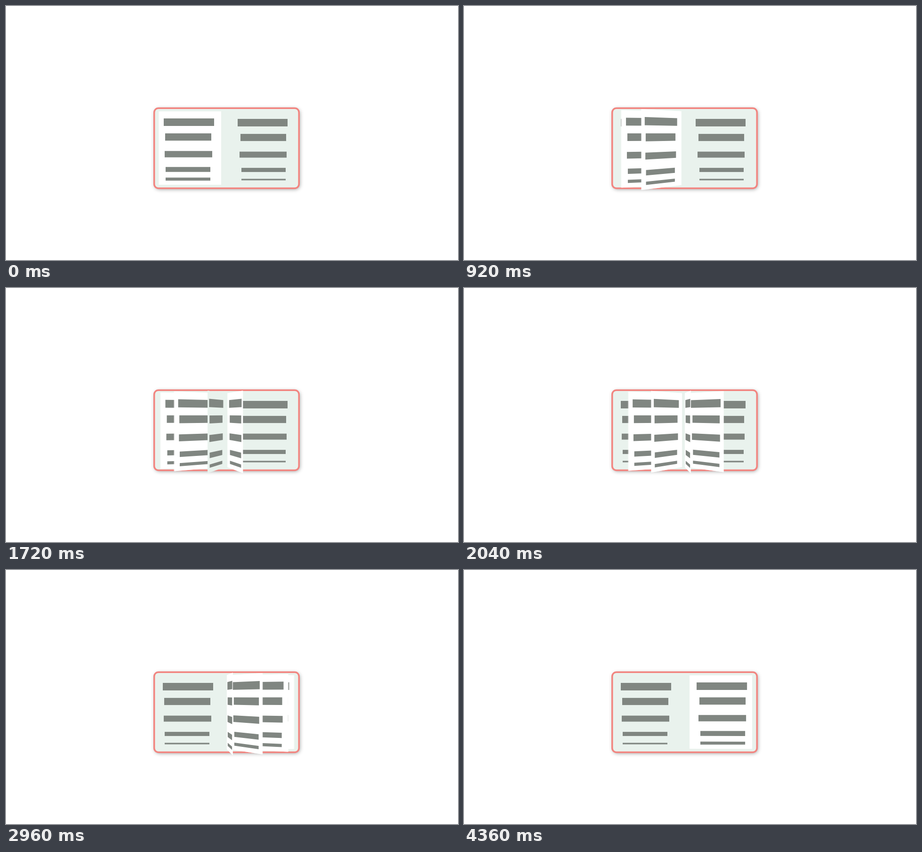
Animation of 960x540 px, one loop 4400 ms. Source, as an HTML page with a canvas:

```html
<!DOCTYPE html>
<html lang="en">
<head>
<meta charset="utf-8">
<title>Turning pages</title>
<style>
  html, body { margin: 0; width: 100%; height: 100%; overflow: hidden; background: #fff; }
  canvas { display: block; width: 960px; height: 540px; }
</style>
</head>
<body>
<canvas id="stage" width="960" height="540"></canvas>
<script>
const ctx = document.getElementById('stage').getContext('2d');

const LOOP = 4400, STEP = 40, TURN = 3000;
const STARTS = [0, 450, 968, 1370];
const SPINE = 468, DEPTH = 1270, EYE_X = 480, EYE_Y = 270;
const INNER = 11, OUTER = 144, SOFT = 1.5, TOP = 224, BOTTOM = 380;
const INK = '#808681', CARD = '#e9f2ed', EDGE = '#f28580';

// Each text line: its middle and its far end, measured from the spine.
// Lines get thinner down the page, and shorter lines start further in.
const LINES = [[247, 133], [278.5, 130], [315, 131], [347.5, 129], [368, 129]]
  .map(([y, far], i) => ({ y, far, near: 26 + 2 * (133 - far), thin: i * i }));

const clamp = v => Math.min(1, Math.max(0, v));

function project(r, y, angle) {
  const k = DEPTH / (DEPTH - r * Math.sin(angle));
  const x = SPINE - r * Math.cos(angle);
  return [EYE_X + (x - EYE_X) * k, EYE_Y + (y - EYE_Y) * k];
}

function fillQuad(r0, r1, top, bottom, angle, color) {
  ctx.fillStyle = color;
  ctx.beginPath();
  ctx.moveTo(...project(r0, top, angle));
  ctx.lineTo(...project(r1, top, angle));
  ctx.lineTo(...project(r1, bottom, angle));
  ctx.lineTo(...project(r0, bottom, angle));
  ctx.closePath();
  ctx.fill();
}

// The front tints just before the page stands upright; the back is white
function paper(turn, alpha) {
  const k = turn < 0.5 ? clamp((turn - 0.365) / 0.035) : 0;
  return `rgba(${255 - 22 * k},${255 - 13 * k},${255 - 18 * k},${alpha})`;
}

function drawPage(turn) {
  const angle = Math.PI * turn;
  fillQuad(INNER, OUTER, TOP, BOTTOM, angle, paper(turn, 0.65));
  fillQuad(INNER, OUTER - SOFT, TOP, BOTTOM, angle, paper(turn, 1));
  for (const { y, near, far, thin } of LINES) {
    const half = 8 - 0.3 * thin;
    fillQuad(near, far, y - half, y + half, angle, INK);
  }
}

function drawCover() {
  ctx.beginPath();
  ctx.roundRect(314.75, 217.25, 307.5, 170.25, 9);
  ctx.save();
  ctx.shadowColor = 'rgba(0,0,0,0.4)';
  ctx.shadowBlur = 9;
  ctx.shadowOffsetX = 1.5;
  ctx.shadowOffsetY = 2;
  ctx.fillStyle = CARD;
  ctx.fill();
  ctx.restore();
  ctx.strokeStyle = EDGE;
  ctx.lineWidth = 3.5;
  ctx.stroke();

  // The printed cover repeats the page lines, slightly shifted and thinner
  ctx.fillStyle = INK;
  for (const { y, near, far, thin } of LINES) {
    const h = 16 - 0.8 * thin, top = y + 1 - h / 2;
    ctx.fillRect(SPINE - 2 - far, top, far - near, h);
    ctx.fillRect(SPINE - 2 + near, top, far - near - 1, h);
  }
}

function draw(t) {
  ctx.fillStyle = '#fff';
  ctx.fillRect(0, 0, 960, 540);
  drawCover();
  const turns = STARTS.filter(s => t >= s).map(s => clamp((t - s) / TURN));
  turns.filter(k => k < 0.5).reverse().forEach(drawPage);
  turns.filter(k => k >= 0.5).forEach(drawPage);
}

const origin = performance.now();
function tick() {
  const t = (performance.now() - origin) % LOOP;
  draw(Math.floor(t / STEP) * STEP);
  requestAnimationFrame(tick);
}
draw(0);
requestAnimationFrame(tick);
</script>
</body>
</html>
```
